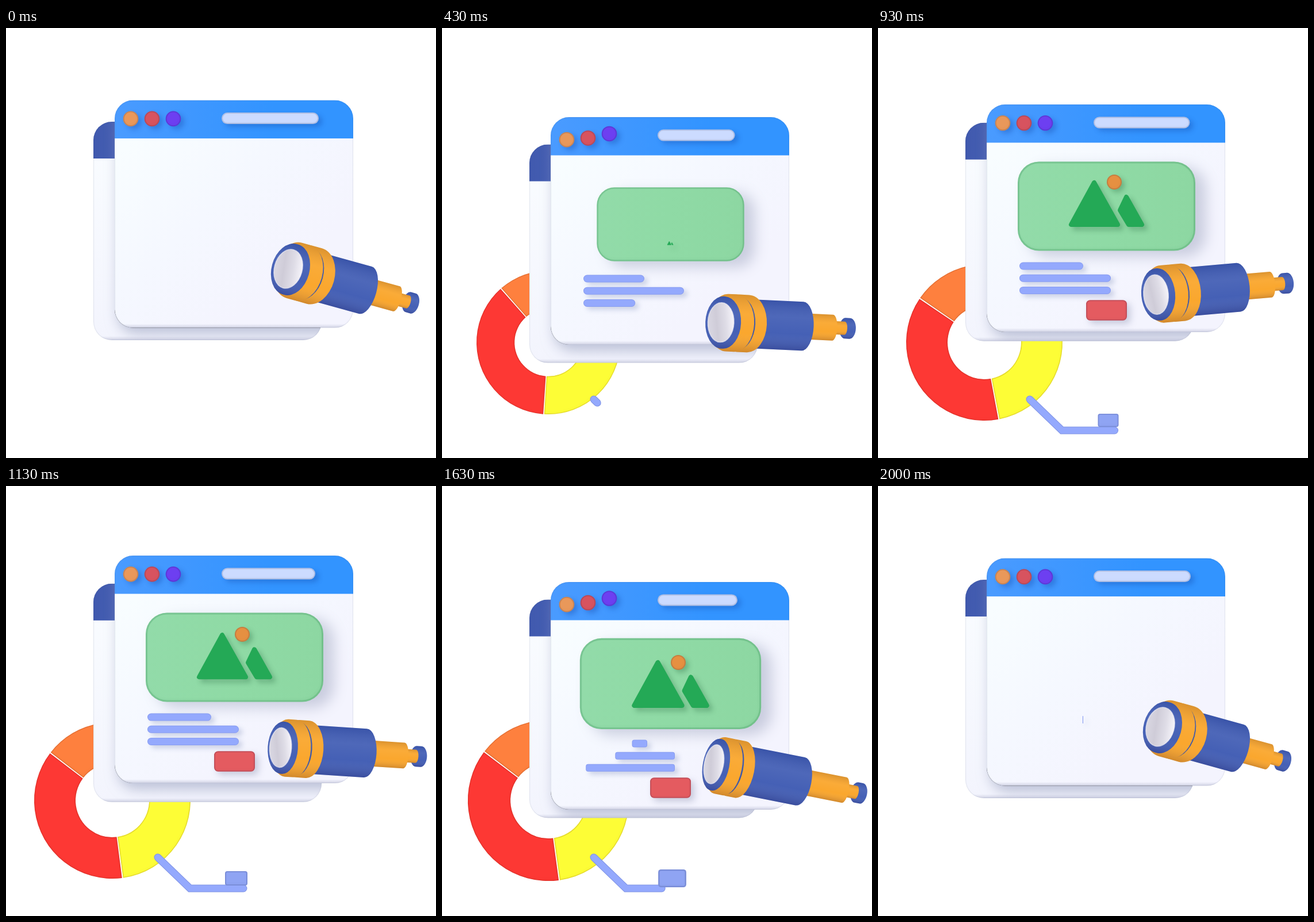
An HTML page with a canvas that plays this animation: 748x748 px, repeating every 2.03 s.

```html
<!DOCTYPE html>
<html lang="en">
<head>
<meta charset="utf-8">
<title>Search window</title>
<style>
html, body { margin: 0; width: 100%; height: 100%; overflow: hidden; background: #fff; }
canvas { display: block; }
</style>
</head>
<body>
<canvas id="stage" width="748" height="748"></canvas>
<script>
const c = document.getElementById('stage').getContext('2d');
const TAU = Math.PI * 2, RAD = Math.PI / 180;
const BLUE = '#3f5bb3', ORANGE = '#faa427', PERI = '#94a9fd';

// Monotone cubic through time/value pairs
function curve(t, ...k) {
  const n = k.length / 2, T = i => k[2 * i], V = i => k[2 * i + 1];
  if (t <= T(0)) return V(0);
  if (t >= T(n - 1)) return V(n - 1);
  const rise = i => (V(i + 1) - V(i)) / (T(i + 1) - T(i));
  const slope = i => {
    if (i === 0 || i === n - 1) return 0;
    const a = rise(i - 1), b = rise(i);
    return a * b <= 0 ? 0 : 2 * a * b / (a + b);
  };
  let i = 0;
  while (t > T(i + 1)) i++;
  const h = T(i + 1) - T(i), u = (t - T(i)) / h, w = 1 - u;
  return V(i) * w * w * (1 + 2 * u) + V(i + 1) * u * u * (3 - 2 * u)
    + h * u * w * (slope(i) * w - slope(i + 1) * u);
}
// Curve through the main poses of the loop
const pose = (t, a, b, d, e, f, g) =>
  curve(t, 0, a, .433, b, .667, d, .933, e, 1.333, f, 1.633, g, 2, a);
const wave = (t, mid, amp, shift = 0) => mid - amp * Math.cos(TAU * (t - shift));

function scoped(fn) { c.save(); fn(); c.restore(); }
function at(x, y, s, fn) {
  if (s > .01) scoped(() => { c.translate(x, y); c.scale(s, s); fn(); });
}
function box(x, y, w, h, r) {
  const p = new Path2D();
  p.roundRect(x, y, w, h, r);
  return p;
}
function disc(x, y, r) {
  const p = new Path2D();
  p.arc(x, y, r, 0, TAU);
  return p;
}
function grad(x0, y0, x1, y1, ...stops) {
  const g = c.createLinearGradient(x0, y0, x1, y1);
  stops.forEach((s, i) => g.addColorStop(i / (stops.length - 1), s));
  return g;
}
function shadow(color, blur, dx, dy) {
  c.shadowColor = color; c.shadowBlur = blur;
  c.shadowOffsetX = dx; c.shadowOffsetY = dy;
}
// Fill with an optional cast shadow and a soft darker rim
function solid(p, fill, cast, rim = '#00104022', width = 4) {
  scoped(() => {
    if (cast) shadow(...cast);
    c.fillStyle = fill;
    c.fill(p);
  });
  scoped(() => {
    c.clip(p);
    shadow(rim, 4, -1, -2);
    c.strokeStyle = rim;
    c.lineWidth = width;
    c.stroke(p);
  });
}

function donut(t) {
  const s = curve(t, .1, 0, .27, 1.155, .433, .919, .56, 1,
    1.6, 1, 1.633, 1.03, 1.75, 1.125, 1.93, 0);
  const turn = pose(t, 100, 93.7, 87.9, 79.3, 85.7, 82.2);
  at(185, 547, s, () => {
    c.rotate(turn * RAD);
    [[0, 135, '#fd3834'], [135, 222, '#fe803e'], [222, 360, '#fdfd36']].forEach(([a, b, color]) => {
      const p = new Path2D();
      p.arc(0, 0, 136, (a + .4) * RAD, (b - .4) * RAD);
      p.arc(0, 0, 64, (b - .7) * RAD, (a + .7) * RAD, true);
      p.closePath();
      solid(p, color, null, '#60200026', 3);
    });
  });
}

function connector(t) {
  const grow = curve(t, .4, 0, .433, .05, .667, .45, .9, .98, 1, 1, 1.58, 1, 1.633, .82, 1.82, 0);
  if (grow > .01) scoped(() => {
    c.lineWidth = 13;
    c.lineCap = 'round';
    c.setLineDash([171 * grow, 999]);
    const p = new Path2D('M264 646L320 700H413');
    c.strokeStyle = '#7f93e4';
    c.stroke(p);
    c.lineWidth = 11;
    c.strokeStyle = PERI;
    c.stroke(p);
  });
  const s = curve(t, .8, 0, .933, .92, 1, 1.15, 1.1, 1, 1.58, 1, 1.633, 1.25, 1.75, 0);
  at(400.5, 682.5, s, () => solid(box(-19.5, -12.5, 39, 25, 4), '#8fa4f3'));
}

function pane(shape, x, w, h, head, colors, body) {
  scoped(() => {
    c.clip(shape);
    c.fillStyle = body;
    c.fillRect(x, 0, w, h);
    c.fillStyle = grad(x, 0, x + w, 0, ...colors);
    c.fillRect(x, 0, w, head);
    c.fillStyle = grad(0, h - 7, 0, h, '#c8cade00', '#c8cadecc');
    c.fillRect(x, h - 7, w, 7);
    shadow('#30408030', 4, 0, 0);
    c.strokeStyle = '#60709022';
    c.lineWidth = 2;
    c.stroke(shape);
  });
}

function windows(t) {
  const backY = wave(t, 183.7, 20.7), topY = wave(t, 144, 23.3, .105);
  const back = box(152, 0, 397, 380, 32), front = box(189, 0, 415, 396, 32);
  scoped(() => {
    c.translate(0, backY);
    pane(back, 152, 397, 380, 64, ['#4059ae', '#5d77c6', '#4059ae'],
      grad(152, 0, 300, 380, '#fafdff', '#f2f3fd'));
    c.clip(back);
    c.translate(0, topY - backY);
    shadow('#9098b890', 22, 6, 10);
    c.fill(front);
  });
  scoped(() => {
    c.translate(0, topY);
    pane(front, 189, 415, 396, 66.5, ['#4a9bff', '#3e97ff', '#3294ff', '#3294ff'],
      grad(220, 70, 460, 330, '#f8fdff', '#f5f8ff', '#f4f4fe'));
    c.clip(front);
    toolbar(t);
    content(t);
  });
}

function toolbar(t) {
  const cast = ['#1040a050', 9, 6, 5];
  ['#e9985a', '#d7535f', '#6d3ff1'].forEach((color, i) => {
    const hop = start => {
      const u = (t - start - i * .072) / .4;
      return u > 0 && u < 1 ? -7 * Math.sin(TAU * u) : 0;
    };
    solid(disc(217 + 37 * i, 32.3 + hop(.121) + hop(1.325), 13.3), color, cast);
  });
  solid(box(375, 21.5, wave(t, 151, -18), 20, 10), '#ccdbff', cast);
}

function content(t) {
  const lag = curve(t, .3, 14, .433, 9.5, .6, 0);
  const card = curve(t, .3, 0, .433, .828, .5, 1.1, .6, 1, 1.6, 1, 1.633, 1.02, 1.72, 1.12, 1.87, 0);
  at(397.5, 177 + lag, card, () =>
    solid(box(-154.5, -77.5, 309, 155, 37), grad(-154, 0, 154, 0, '#92dba9', '#8fdaa5', '#8dd7a2'),
      ['#8088a860', 24, 18, 10], '#1a703c30', 6));

  const sink = curve(t, .433, 0, .933, 0, 1.333, 5, 1.633, 6);
  const hills = curve(t, .42, 0, .433, .08, .53, 1.15, .6, .96, .667, 1,
    1.6, 1, 1.633, 1.025, 1.7, 1.1, 1.82, 0);
  const peaks = new Path2D('M-21 -77L-61 -4H20ZM35 -52L62 -4H39L24 -29Z');
  at(397, 213 + lag + sink, hills, () => {
    shadow('#20603850', 9, 6, 6);
    c.fillStyle = c.strokeStyle = '#24a956';
    c.lineWidth = 8;
    c.lineJoin = 'round';
    c.stroke(peaks);
    c.shadowColor = 'transparent';
    c.fill(peaks);
  });
  const sun = curve(t, .5, 0, .6, 1.15, .667, 1, 1.633, 1, 1.7, 1.15, 1.8, 0);
  at(411, 135 + sink * .85, sun, () => solid(disc(0, 0, 13), '#e69041', ['#20603850', 8, 5, 5]));

  const ends = [
    curve(t, .15, 0, .3, 1.12, .433, .955, .55, 1),
    curve(t, .25, 0, .433, 1.1, .64, .96, .667, .962, .8, 1),
    curve(t, .36, 0, .433, .565, .53, 1.15, .667, 1.03, .8, 1)
  ];
  const starts = [
    curve(t, 1.5, 0, 1.633, .76, 1.68, .99),
    curve(t, 1.55, 0, 1.633, .346, 1.73, 1),
    curve(t, 1.61, 0, 1.633, .026, 1.78, 1)
  ];
  [111, 159, 159].forEach((w, i) => {
    const x = w * starts[i], len = w * ends[i] - x;
    if (len > 1) solid(box(246 + x, 274.5 + 21.2 * i, len, 13, x > 1 ? 4 : 6.5), PERI,
      ['#7080b050', 9, 6, 5], '#20308018', 2);
  });

  const button = curve(t, .7, 0, .82, 1.15, .9, .97, .933, 1, 1.633, 1, 1.7, 1.15, 1.82, 0);
  at(397.5, 358, button, () =>
    solid(box(-35.5, -17.8, 71, 35.6, 7), '#e45b60', ['#8088a860', 12, 6, 6]));
}

// Side view of a tilted cylinder; k is the roundness of its ends
function tube(x0, x1, r, k, color) {
  const p = new Path2D();
  p.ellipse(x1, 0, r * k, r, 0, -TAU / 4, TAU / 4);
  p.ellipse(x0, 0, r * k, r, 0, TAU / 4, TAU * .75);
  p.closePath();
  c.fillStyle = color;
  c.fill(p);
  c.fillStyle = grad(0, -r, 0, r, '#10206022', '#ffffff14', '#ffffff08', '#20104030');
  c.fill(p);
}

function telescope(t) {
  const x = pose(t, 625, 627, 627, 627, 623, 623);
  const y = wave(t, 483, 35, -.01) + pose(t, 8, 3, 2.5, 1, 6.6, 9);
  const front = -pose(t, 136, 139, 142, 141, 149, 150);
  const end = pose(t, 82, 78.5, 82, 82, 104, 104);
  const k = pose(t, 32, 30, 28.5, 28.5, 22, 22) / 45.5;
  scoped(() => {
    c.translate(x, y);
    c.rotate(pose(t, 15.5, 2.7, -6.8, -5, 11.2, 11.2) * RAD);
    tube(end - 4, end + 4, 18, .58, BLUE);
    tube(10, end - 5, 11.5, .4, ORANGE);
    tube(0, end - 26, 22.5, .36, ORANGE);
    tube(front + 30, 0, 42.5, .46, BLUE);
    tube(front + 27, front + 44, 50, k, ORANGE);
    tube(front + 18, front + 26, 47, k, '#3852a4');
    tube(front + 8, front + 22, 50, k, ORANGE);
    tube(front, front + 2, 45.5, k, BLUE);
    const r = 34.5, w = r * k;
    c.translate(front - 3, 0);
    c.beginPath();
    c.ellipse(0, 0, w, r, 0, 0, TAU);
    c.fillStyle = grad(-w, 0, w, -6, '#d9d7e2', '#cfccd8', '#dedce6', '#f6f4fa');
    c.fill();
    c.strokeStyle = '#f0eff6aa';
    c.lineWidth = 1.5;
    c.stroke();
  });
}

const begin = performance.now();
function draw() {
  // Steps of 1/30 s; the last step repeats the opening pose
  const ms = (performance.now() - begin) % 2030;
  const t = Math.floor(ms * .03 + .15) / 30;
  c.clearRect(0, 0, 748, 748);
  donut(t);
  connector(t);
  windows(t);
  telescope(t);
  requestAnimationFrame(draw);
}
draw();
</script>
</body>
</html>
```
